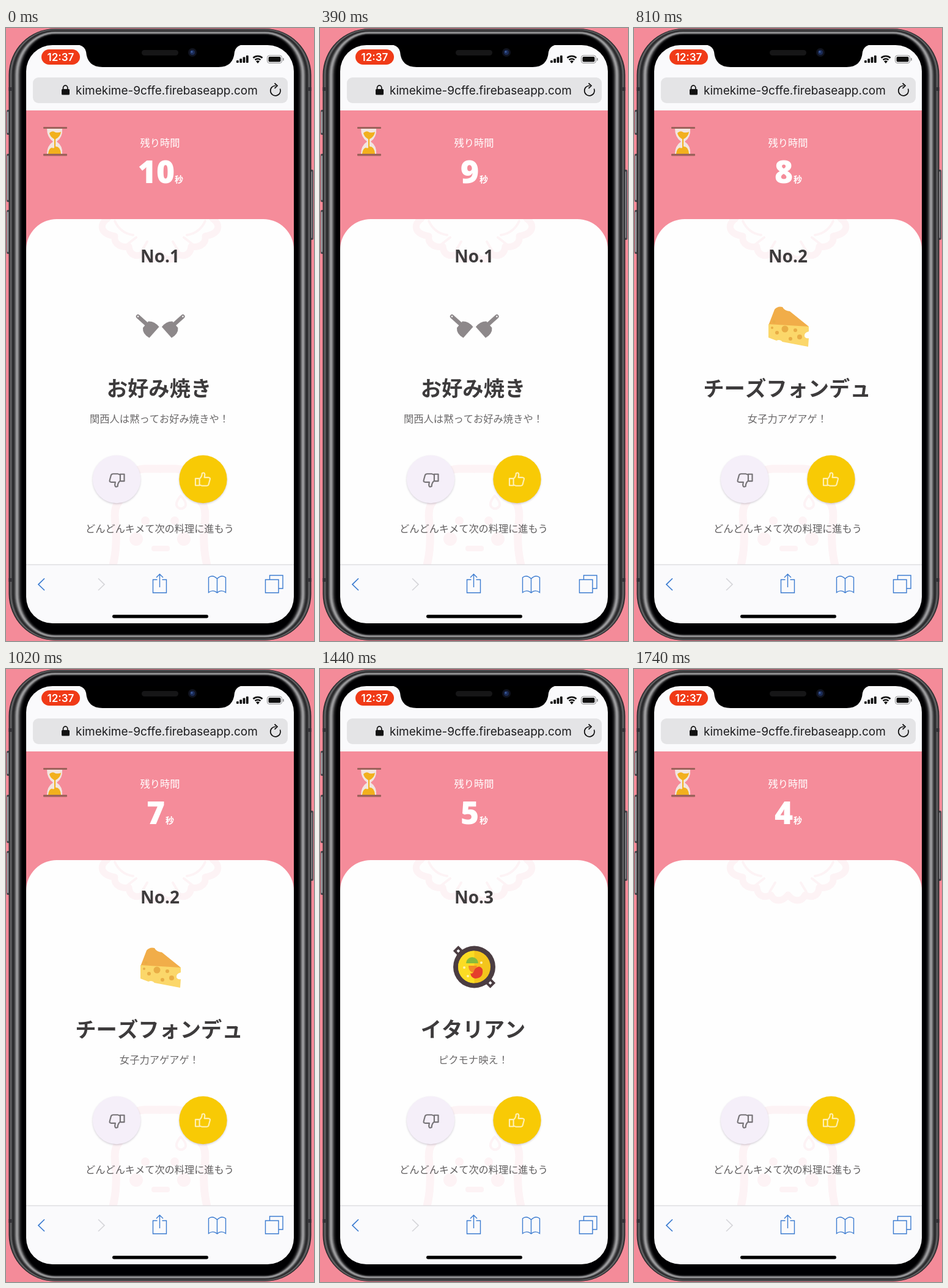
Animation of 504x1004 px, one loop 1.77 s. Source, as an HTML page with a canvas:

```html
<!DOCTYPE html>
<html lang="ja">
<head>
<meta charset="utf-8">
<style>
html, body { margin: 0; width: 100%; height: 100%; overflow: hidden; background: #f48b99; }
canvas { display: block; }
</style>
</head>
<body>
<canvas id="stage" width="504" height="1004"></canvas>
<script>
const c = document.getElementById('stage').getContext('2d');
const LOOP = 1770;
const PINK = '#f58c9a';
const BLUE = '#3b7bd0';
const CJK = '"Noto Sans CJK JP", "Noto Sans CJK", sans-serif';
const LATIN = 'Inter, sans-serif';
const HEAVY = '"Open Sans", sans-serif';

function box(x, y, w, h, r, color) {
  c.beginPath();
  c.roundRect(x, y, w, h, r);
  c.fillStyle = color;
  c.fill();
}
function disc(x, y, r, color) {
  c.beginPath();
  c.arc(x, y, r, 0, 7);
  c.fillStyle = color;
  c.fill();
}
function shape(d, color) {
  c.fillStyle = color;
  c.fill(new Path2D(d));
}
function line(d, color, width = 1.4) {
  c.strokeStyle = color;
  c.lineWidth = width;
  c.stroke(new Path2D(d));
}
function text(s, x, y, font, color, align = 'center') {
  c.font = font;
  c.fillStyle = color;
  c.textAlign = align;
  c.fillText(s, x, y);
}
function mirrored(axis, draw) {
  draw();
  c.save();
  c.translate(axis * 2, 0);
  c.scale(-1, 1);
  draw();
  c.restore();
}

const bump = (x, mid, width) => Math.exp(-(((x - mid) / width) ** 2));

function phone() {
  box(0, 0, 504, 1004, 0, '#f48b99');
  for (const [y, h] of [[134, 41], [206, 79], [298, 72]]) {
    box(1, y, 7, h, 2, '#4b4b50');
    box(2, y + 3, 2, h - 6, 1, '#b2b0b5');
  }
  box(496, 232, 7, 115, 2, '#4b4b50');
  box(499, 235, 2, 109, 1, '#9c9a9f');

  // metal rim: a thin outer glint, then a broad one, fading to the black bezel
  for (let d = 0; d <= 22; d++) {
    const dy = d * 0.5;
    const v = (35 + 70 * bump(d, 3, 1.8) + 125 * bump(d, 13, 3.5)) * Math.min(1, (22 - d) / 5);
    box(4.5 + d, 1 + dy, 495 - d * 2, 1002 - dy * 2, { x: 76 - d, y: 76 - dy }, `rgb(${v},${v},${v + 2})`);
  }
  for (const y of [97, 901]) {
    box(4.5, y, 5, 6, 0, '#333237');
    box(494.5, y, 5, 6, 0, '#333237');
  }
}

function statusBar() {
  box(33, 28, 438, 107, 0, '#fafafc');
  shape('M116 27 Q129 29 131 39 Q133 64 158 64 H348 Q372 64 374 39 Q376 29 388 27Z', '#000');
  box(222, 36, 60, 9, 4.5, '#161617');
  disc(305, 40, 7, '#10131f');
  disc(305, 40, 4, '#1b2c58');
  disc(304, 39, 1.5, '#4162a4');

  box(58, 35, 63, 25, 12.5, '#f03a17');
  text('12:37', 89.5, 53.5, '600 17px ' + LATIN, '#fff');

  for (let i = 0; i < 4; i++) {
    const h = 4 + i * 2.7;
    box(377 + i * 5.3, 57 - h, 3.8, h, 1, '#111');
  }
  c.lineCap = 'butt';
  for (const r of [6.5, 11]) {
    c.beginPath();
    c.arc(412, 57, r, -2.32, -0.82);
    c.strokeStyle = '#111';
    c.lineWidth = 2.6;
    c.stroke();
  }
  shape('M412 58 L409 54.5 Q412 52 415 54.5Z', '#111');
  c.beginPath();
  c.roundRect(427.5, 45, 24, 12.5, 3.5);
  c.strokeStyle = '#8b8b8d';
  c.lineWidth = 1;
  c.stroke();
  box(429.5, 47, 20, 8.5, 2, '#111');
  box(453, 49, 1.7, 4.5, 1, '#8b8b8d');

  box(44, 81, 417, 42, 9, '#e4e4e6');
  box(91, 100, 13, 9.5, 1.5, '#111');
  line('M93.5 101 V98 A3.6 3.8 0 0 1 100.8 98 V101', '#111', 1.7);
  text('kimekime-9cffe.firebaseapp.com', 114, 108.5, '400 19px ' + LATIN, '#1c1c1e', 'left');
  line('M448.5 99.5 A8.2 8.2 0 1 1 441.5 94.5', '#111', 1.7);
  line('M439.5 90.5 L444 94.5 L439.5 98.8', '#111', 1.7);
}

function hourglass() {
  shape('M67 165 H92 Q93 179 83 186 Q93 193 92 206 H67 Q67 193 77 186 Q67 179 67 165Z', '#f2e5df');
  shape('M71 172 Q76 167 81 171 Q86 172 90 170 Q89 178 81 182 L79 182 Q72 178 71 172Z', '#f2b01d');
  box(79, 181, 2, 15, 0, '#f2b01d');
  shape('M69 206 Q70 197 75 196 Q79 198 81 194 Q89 194 90 206Z', '#f2b01d');
  box(61, 162, 39, 3, 1, '#9c625b');
  box(61, 206, 39, 3.5, 1, '#9c625b');
}

function mascot() {
  const tint = '#fdf3f5';
  c.lineJoin = c.lineCap = 'round';
  mirrored(252, () => {
    line('M166 312 C152 322 154 337 178 341 C176 355 190 360 201 358 C202 372 214 376 224 370 C230 382 242 382 252 370', tint, 11);
    line('M178 316 Q187 336 208 339 M199 354 L213 343 M222 365 L231 350', tint, 4);
    line('M252 722 H226 Q199 724 192 750 Q189 771 182 780 Q176 790 179 812 Q183 850 174 884', tint, 13);
    disc(213, 837, 11, tint);
    disc(228, 807, 7, tint);
  });
  box(238, 848, 30, 9, 4, tint);
  line('M286 766 Q275 779 281 785 Q287 790 293 784 Q297 778 286 766Z', tint, 4);
  c.lineJoin = 'miter';
  c.lineCap = 'butt';
}

function thumb(x, y, turn, color) {
  c.save();
  c.translate(x, y);
  c.rotate(turn);
  c.scale(1.2, 1.14);
  c.translate(-12, -11.5);
  c.lineJoin = 'round';
  line('M7.5 10.5 V20.5 H2 V10.5Z M7.5 11 Q11 8 11 3 Q14.5 1 14.8 5 L14.2 9 H20 Q22.6 9.4 21.8 12 L20 19 Q19.4 21 17 21 H11 L7.5 19.5', color, 1.8);
  c.restore();
}

function roundButton(x, color) {
  c.save();
  c.shadowColor = 'rgba(70,50,80,.22)';
  c.shadowBlur = 3;
  c.shadowOffsetY = 1.5;
  disc(x, 739, 39.2, color);
  c.restore();
}

function spatulas() {
  mirrored(252.7, () => {
    c.lineCap = 'round';
    line('M216 472.5 L231 486', '#8d888a', 6.5);
    c.lineCap = 'butt';
    shape('M224 491 L233 480.5 Q243 480 250.5 489.5 L234.5 507.5 Q223 501 224 491Z', '#8d888a');
    disc(216, 472.5, 1.2, '#fff');
  });
}

function cheese() {
  shape('M220 487 L230 461 Q235 455 243 457 Q246 463 255 464 L286 489 L284 493Z', '#f1ad49');
  shape('M220 485 L286 489 L286 497 Q278 499 279 505 Q281 509 286 508 L285 522 L243 514 Q239 509 233 512 L220 507Z', '#fbd76a');
  const holes = [[229, 481, 2.5], [247, 493, 5.5], [234, 499, 3], [264, 495, 3], [271, 506, 4], [256, 509, 3], [226, 491, 2]];
  for (const [x, y, r] of holes) disc(x, y, r, '#e9ad45');
}

function pan() {
  c.save();
  c.translate(252.5, 488);
  c.rotate(Math.PI / 4);
  for (const x of [-37, 37]) {
    c.strokeStyle = '#4b3d42';
    c.lineWidth = 4;
    c.strokeRect(x - 4, -4, 8, 8);
  }
  c.restore();
  disc(252.5, 488, 34.5, '#4b3d42');
  disc(252.5, 488, 26.5, '#f4c51c');
  shape('M252.5 461.5 A26.5 26.5 0 0 0 252.5 514.5Z', '#fbdc24');
  shape('M239 482 A10 10 0 0 1 259 482Z', '#86bb3c');
  shape('M243 486 H257 Q255 496 249 497 Q243 494 243 486Z', '#f18a26');
  shape('M246 498 Q250 501 253 492 Q261 483 266 492 Q268 506 254 507 Q247 506 246 498Z', '#e5402c');
  for (const [x, y] of [[236, 489], [264, 481], [242, 503]]) disc(x, y, 2, '#fff3b0');
}

const cards = [
  { no: 'No.1', icon: spatulas, name: 'お好み焼き', note: '関西人は黙ってお好み焼きや！', from: -200, out: 480 },
  { no: 'No.2', icon: cheese, name: 'チーズフォンデュ', note: '女子力アゲアゲ！', from: 630, out: 1050 },
  { no: 'No.3', icon: pan, name: 'イタリアン', note: 'ピクモナ映え！', from: 1200, out: 1620 }
];
const ENTER = 90, LEAVE = 120;
const unit = v => Math.max(0, Math.min(1, v));

function card(d, t) {
  const q = unit((t - d.out) / LEAVE);
  const alpha = unit((t - d.from) / ENTER) * (1 - q);
  if (!alpha) return;
  c.save();
  c.globalAlpha = alpha;
  c.translate(252 - 146 * q, 516);
  c.rotate(-q * 40 * Math.PI / 180);
  c.translate(-252, -516);
  text(d.no, 252, 384, '700 28px ' + HEAVY, '#3d3b3c');
  d.icon();
  text(d.name, 250.5, 603, '700 34.3px ' + CJK, '#3d3b3c');
  text(d.note, 251, 645.5, '400 16.3px ' + CJK, '#6b696a');
  c.restore();
}

function counter(t) {
  const n = 10 - Math.floor((t + 55) / 290);
  const shift = n > 9 ? 15 : 0;
  text(n, 245 + shift / 15, 254, '800 51.5px ' + HEAVY, '#fff');
  text('秒', 268 + shift, 252.5, '700 14px ' + CJK, '#fff');
}

function toolbar() {
  box(33, 879, 438, 96, 0, '#fafafc');
  box(33, 878.5, 438, 1, 0, '#d2d2d6');
  line('M63 901.5 L53 911.3 L63 921', BLUE, 1.7);
  line('M151 901.5 L161 911.3 L151 921', '#d6d6da', 1.7);
  line('M247.5 903.5 H240.5 V925 H262.5 V903.5 H255.5 M251.5 916 V894.5 M246 900 L251.5 894.5 L257 900', BLUE);
  line('M345.5 902 Q338 894.5 331.5 900 V924.5 Q339 919 345.5 925 Q352 919 359.5 924.5 V900 Q353 894.5 345.5 902 V925', BLUE);
  line('M424.5 903.5 H446 V925 H424.5Z M431.5 903 V896.5 H453 V918 H446.5', BLUE);
  box(174, 961, 157, 5.5, 2.75, '#000');
}

function draw(t) {
  phone();
  c.save();
  c.beginPath();
  c.roundRect(33, 28, 438, 947, 43);
  c.clip();
  box(33, 134, 438, 745, 0, PINK);
  statusBar();
  hourglass();
  text('残り時間', 252, 193.5, '400 16.3px ' + CJK, '#fff');
  counter(t);

  c.save();
  c.beginPath();
  c.roundRect(33, 313, 438, 566, [50, 50, 0, 0]);
  c.fillStyle = '#fefefe';
  c.fill();
  c.clip();
  mascot();
  for (const d of cards) card(d, t);
  roundButton(181, '#f5eff9');
  thumb(181.5, 741, Math.PI, '#777478');
  roundButton(322.5, '#f8ca05');
  thumb(322, 739, 0, '#fff0b4');
  text('どんどんキメて次の料理に進もう', 251.5, 826, '400 16.2px ' + CJK, '#5f5d5e');
  c.restore();

  toolbar();
  c.restore();
}

const start = performance.now();
function tick() {
  draw((performance.now() - start) % LOOP);
  requestAnimationFrame(tick);
}
tick();
</script>
</body>
</html>
```
